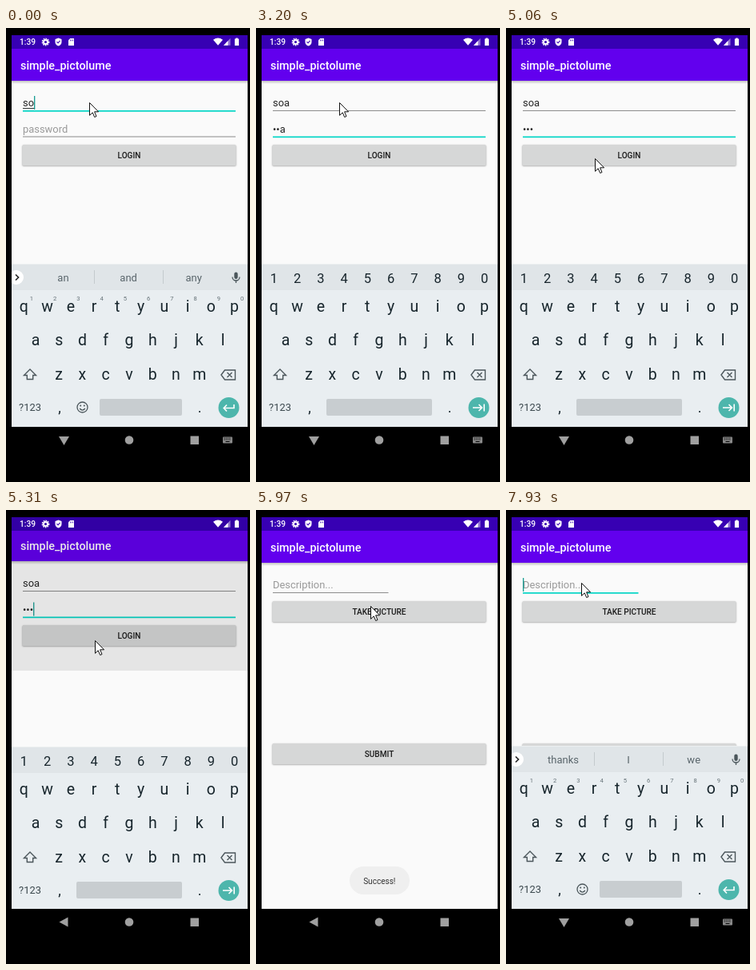
Animation of 305x568 px, one loop 8 s. Source, as an HTML page with a canvas:

```html
<!DOCTYPE html>
<html lang="en">
<head>
<meta charset="utf-8">
<title>Login demo</title>
<style>
  html, body { margin: 0; width: 100%; height: 100%; overflow: hidden; background: #000; }
  canvas { display: block; }
</style>
</head>
<body>
<canvas id="stage" width="305" height="568"></canvas>
<script>
const ctx = document.getElementById('stage').getContext('2d');
const LOOP = 8000;
const USER = 'soa';
const TITLE = 'simple_pictolume';
const SCREEN = { left: 7, right: 302, top: 9, bottom: 499 };
const KEY_STEP = 29.25;
const PAPER = '#fafafa', TEAL = '#03d6c6', INK = '#17252c', KEY_ICON = '#4b565b';

// Each entry changes part of the state from its time on.
const timeline = [
  [0, { page: 'login', user: USER.slice(0, 2), pass: '', focus: 'user', caret: true, composing: true,
        keys: 'words', words: ['an', 'and', 'any'], keysDy: 0, keysAlpha: 1, imeNav: true,
        mouse: [104, 93], press: 0, reveal: 0, shift: 0, toast: 0 }],
  [280, { user: USER, words: [USER, 'and', 'as'] }],
  [810, { focus: 'pass', composing: false }],
  [930, { keys: 'digits' }],
  [1350, { caret: false }],
  [1750, { caret: true }],
  [2000, { pass: USER[0] }],
  [2370, { pass: '•' + USER[1] }],
  [2770, { pass: '••' + USER[2] }],
  [3200, { caret: false }],
  [3450, { mouse: [109, 111] }],
  [3570, { mouse: [114, 128] }],
  [3720, { mouse: [115, 147], caret: true }],
  [3870, { mouse: [111, 161] }],
  [4020, { mouse: [111, 163], pass: '•••', press: 0.3 }],
  [4140, { press: 0.7 }],
  [4260, { press: 1, caret: false }],
  [4380, { press: 0, caret: true }],
  [5060, { caret: false }],
  [5310, { page: 'opening', caret: true, reveal: 201, shift: 8, keysDy: 1, imeNav: false }],
  [5430, { reveal: 62, shift: 3, keysDy: 45, keysAlpha: 0.8 }],
  [5550, { reveal: 16, shift: 1, keysDy: 150, keysAlpha: 0.4, toast: 0.4 }],
  [5670, { page: 'post', keys: '', shift: 0, focus: '', caret: false, toast: 1 }],
  [5820, { mouse: [112, 163] }],
  [5970, { mouse: [143, 120] }],
  [6120, { mouse: [117, 79] }],
  [6240, { mouse: [102, 88] }],
  [6390, { mouse: [99, 98] }],
  [6540, { mouse: [97, 94] }],
  [6660, { mouse: [94, 91] }],
  [6810, { focus: 'note', toast: 0.8 }],
  [6960, { caret: true, toast: 0.35, imeNav: true }],
  [7110, { keys: 'words', words: [], keysDy: 2, keysAlpha: 0.85, toast: 0 }],
  [7260, { keysDy: 0, keysAlpha: 1, words: ['thanks', 'I', 'we'] }],
  [7380, { caret: false }],
  [7930, { caret: true }],
];

const stateAt = time =>
  Object.assign({}, ...timeline.filter(([start]) => start <= time).map(([, change]) => change));

function box(x, y, w, h, color) {
  ctx.fillStyle = color;
  ctx.fillRect(x, y, w, h);
}

function rounded(x, y, w, h, r, color) {
  ctx.fillStyle = color;
  ctx.beginPath();
  ctx.roundRect(x, y, w, h, r);
  ctx.fill();
}

function disc(x, y, r, color) {
  ctx.fillStyle = color;
  ctx.beginPath();
  ctx.arc(x, y, r, 0, Math.PI * 2);
  ctx.fill();
}

function text(str, x, y, size, color, align = 'center', weight = 400) {
  ctx.font = `${weight} ${size}px Roboto, sans-serif`;
  ctx.textAlign = align;
  ctx.fillStyle = color;
  ctx.fillText(str, x, y);
  return ctx.measureText(str).width;
}

// Draws an SVG path with its origin at x, y; a line width makes it an outline.
function shape(d, x, y, color, line = 0) {
  ctx.save();
  ctx.translate(x, y);
  const path = new Path2D(d);
  ctx.lineWidth = line;
  ctx.strokeStyle = ctx.fillStyle = color;
  line ? ctx.stroke(path) : ctx.fill(path);
  ctx.restore();
}

function layer(draw, { dy = 0, alpha = 1, top = 0, bottom = 568 }) {
  ctx.save();
  ctx.beginPath();
  ctx.rect(SCREEN.left, top, SCREEN.right - SCREEN.left, bottom - top);
  ctx.clip();
  ctx.globalAlpha = alpha;
  ctx.translate(0, dy);
  draw();
  ctx.restore();
}

function statusIcons() {
  text('1:39', 17, 21, 10.2, '#fff', 'left', 500);
  ctx.setLineDash([1.6, 1.15]);
  shape('M4.2 0A4.2 4.2 0 1 1 -4.2 0A4.2 4.2 0 1 1 4.2 0', 49.5, 17.5, '#fff', 1.4);
  ctx.setLineDash([]);
  shape('M2.6 0A2.6 2.6 0 1 1 -2.6 0A2.6 2.6 0 1 1 2.6 0', 49.5, 17.5, '#fff', 2);
  shape('M0-5L4-3.4V0Q4 3.6 0 5Q-4 3.6-4 0V-3.4Z', 65.5, 17.5, '#fff');
  shape('M-2 0L-.4 1.6L2-1.4', 65.5, 17.2, '#3700b3', 1.1);
  shape('M-1.3-4.5H3.5V4.5H-3.5V-2.3Z', 81.5, 17.5, '#fff');
  shape('M-1-3V-1.2M.6-3V-1.2M2.2-3V-1.2', 81.5, 17.5, '#3700b3', 0.7);
  shape('M0 4.5L-6-2.6Q0-7 6-2.6Z', 265, 17.3, '#fff');
  shape('M-4 4.5L4.5-4.5V4.5Z', 276, 17.3, 'rgba(255,255,255,.45)');
  shape('M-4 4.5L1.5-1.3V4.5Z', 276, 17.3, '#fff');
  shape('M-1.2-4.7H1.2V-3.8H2.6V4.7H-2.6V-3.8H-1.2Z', 288.5, 17.3, '#fff');
}

function page(content) {
  box(7, 20, 295, 479, PAPER);
  content();
  const shade = ctx.createLinearGradient(0, 66, 0, 70);
  shade.addColorStop(0, 'rgba(0,0,0,.24)');
  shade.addColorStop(1, 'rgba(0,0,0,0)');
  box(7, 66, 295, 4, shade);
  box(7, 20, 295, 46, '#6200ee');
  text(TITLE, 18, 51.5, 14.36, '#fff', 'left', 500);
}

function field(value, hint, baseline, right, focused, caret, composing) {
  const width = text(value, 21, baseline, 12.92, '#222', 'left');
  if (!value) text(hint, 21, baseline, 12.92, '#999', 'left');
  if (composing) box(21, baseline + 2, width, 1, '#333');
  if (focused) box(21, baseline + 5, right - 21, 1.7, TEAL);
  else box(21, baseline + 5, right - 21, 1, '#8c8c8c');
  if (focused && caret) box(21 + width, baseline - 13, 1.3, 17, '#159c91');
}

function button(label, y, press = 0) {
  const tone = Math.round(214 - 28 * press);
  ctx.save();
  ctx.shadowColor = 'rgba(0,0,0,.35)';
  ctx.shadowBlur = 2 + 2 * press;
  ctx.shadowOffsetY = 0.8 + press;
  rounded(20.5, y, 267, 26, 1.5, `rgb(${tone},${tone + 1},${tone + 1})`);
  ctx.restore();
  text(label, 154, y + 17, 10.05, '#1b1b1b', 'center', 500);
}

function loginPage(s) {
  page(() => {
    field(s.user, 'username', 98, 287, s.focus === 'user', s.caret, s.composing);
    field(s.pass, 'password', 130.5, 287, s.focus === 'pass', s.caret);
    button('LOGIN', 146, s.press);
  });
}

function postPage(s) {
  page(() => {
    field('', 'Description...', 98, 165.5, s.focus === 'note', s.caret);
    button('TAKE PICTURE', 114);
    button('SUBMIT', 292);
  });
}

function toast() {
  rounded(117, 446, 75, 35, 17.5, '#efefef');
  text('Success!', 154.3, 467.5, 10.05, '#333');
}

function keyRow(letters, x, y, size, color = INK) {
  [...letters].forEach((c, i) => text(c, x + i * KEY_STEP, y, size, color));
}

function suggestions(words) {
  words.forEach((word, i) => text(word, 71.5 + i * 81.6, 317, 13, '#59656b'));
  box(110, 303, 1, 17, '#c4cacd');
  box(196, 303, 1, 17, '#c4cacd');
  disc(13, 312, 9, '#fff');
  shape('M-2-3.5L1.6 0L-2 3.5', 14, 312, '#222', 1.6);
  rounded(285.3, 305.5, 4.4, 8.5, 2.2, KEY_ICON);
  shape('M-4.5 0A4.5 4.5 0 0 0 4.5 0M0 4.5V7.5', 287.5, 311.5, KEY_ICON, 1.3);
}

function keyboard(s) {
  const digits = s.keys === 'digits';
  box(7, 296, 295, 203, '#e9eef1');
  box(7, 296, 295, 32, '#e0e5e8');
  box(7, 295, 295, 1, '#eceff0');
  if (digits) {
    keyRow('1234567890', 22.3, 318.5, 16.5);
  } else {
    suggestions(s.words);
    keyRow('1234567890', 31.8, 341, 7.6, '#657177');
  }
  keyRow('qwertyuiop', 22.3, 355, 19.5);
  keyRow('asdfghjkl', 37, 397, 19.5);
  keyRow('zxcvbnm', 66.2, 439.5, 19.5);
  shape('M0-6.5L7.5 1H3.7V6H-3.7V1H-7.5Z', 30, 433.5, KEY_ICON, 1.4);
  shape('M-9 0L-4.5-6H8.5V6H-4.5ZM-1.5-3L4.5 3M4.5-3L-1.5 3', 278, 434, KEY_ICON, 1.4);

  text('?123', 30, 479, 12.9, '#3a474d');
  text(',', 67, 481, 18, INK);
  text('.', 242, 481, 18, INK);
  const spaceX = digits ? 88 : 117;
  rounded(spaceX, 464, 220 - spaceX, 21, 2, '#c8cdd0');
  if (!digits) {
    shape('M6.5 0A6.5 6.5 0 1 1 -6.5 0A6.5 6.5 0 1 1 6.5 0M-3.4 1.5Q0 5.6 3.4 1.5', 95.5, 474.5, KEY_ICON, 1.3);
    disc(93.2, 472.5, 1, KEY_ICON);
    disc(97.8, 472.5, 1, KEY_ICON);
  }
  disc(278.5, 475, 13, '#4db6ac');
  const enter = digits ? 'M-7.5 0H3.5M0-4L4 0L0 4M6.7-4.5V4.5' : 'M6.5-4V.5H-6M-2.5-3.5L-6.3 .5L-2.5 4.5';
  shape(enter, 278.5, 475, '#fff', 1.6);
}

function navBar(imeNav) {
  const gray = '#a0a0a0';
  box(0, 499, 305, 69, '#000');
  shape(imeNav ? 'M-6.5-4.5H6.5L0 6.5Z' : 'M-6 0L5-6V6Z', 72.5, 515.5, gray);
  disc(154, 515.5, 5.3, gray);
  box(230.5, 510.5, 10.5, 10.5, gray);
  if (!imeNav) return;
  rounded(271, 511.5, 12, 8, 1, '#8a8a8a');
  ctx.setLineDash([1.2, 1]);
  shape('M-4.5-2H4.5M-4.5 0H4.5', 277, 515, '#000', 1);
  ctx.setLineDash([]);
  box(274.5, 517, 5, 1, '#000');
}

function pointer([x, y]) {
  const arrow = 'M.5 .5V16.3L4.2 12.8L6.7 18.5L9 17.5L6.6 11.8H11.6Z';
  shape(arrow, x, y, '#fff');
  shape(arrow, x, y, '#111', 1);
}

function draw(s) {
  box(0, 0, 305, 568, '#000');
  const { top, bottom } = SCREEN;
  const opening = s.page === 'opening';
  if (s.page !== 'post') layer(() => loginPage(s), { dy: opening ? -2 : 0, top, bottom });
  box(7, 9, 295, 17, '#3700b3');
  if (opening) box(7, 9, 295, 490, 'rgba(0,0,0,.085)');
  if (s.page !== 'login') {
    const post = opening ? { ...s, focus: '' } : s;
    layer(() => postPage(post), { dy: s.shift, top: opening ? Math.max(26, s.reveal) : 26, bottom });
  }
  statusIcons();
  if (s.keys) layer(() => keyboard(s), { dy: s.keysDy, alpha: s.keysAlpha, top, bottom: bottom + 1 });
  if (s.toast) layer(toast, { alpha: s.toast });
  navBar(s.imeNav);
  pointer(s.mouse);
}

const began = performance.now();
function tick() {
  draw(stateAt((performance.now() - began) % LOOP));
  requestAnimationFrame(tick);
}
tick();
</script>
</body>
</html>
```
